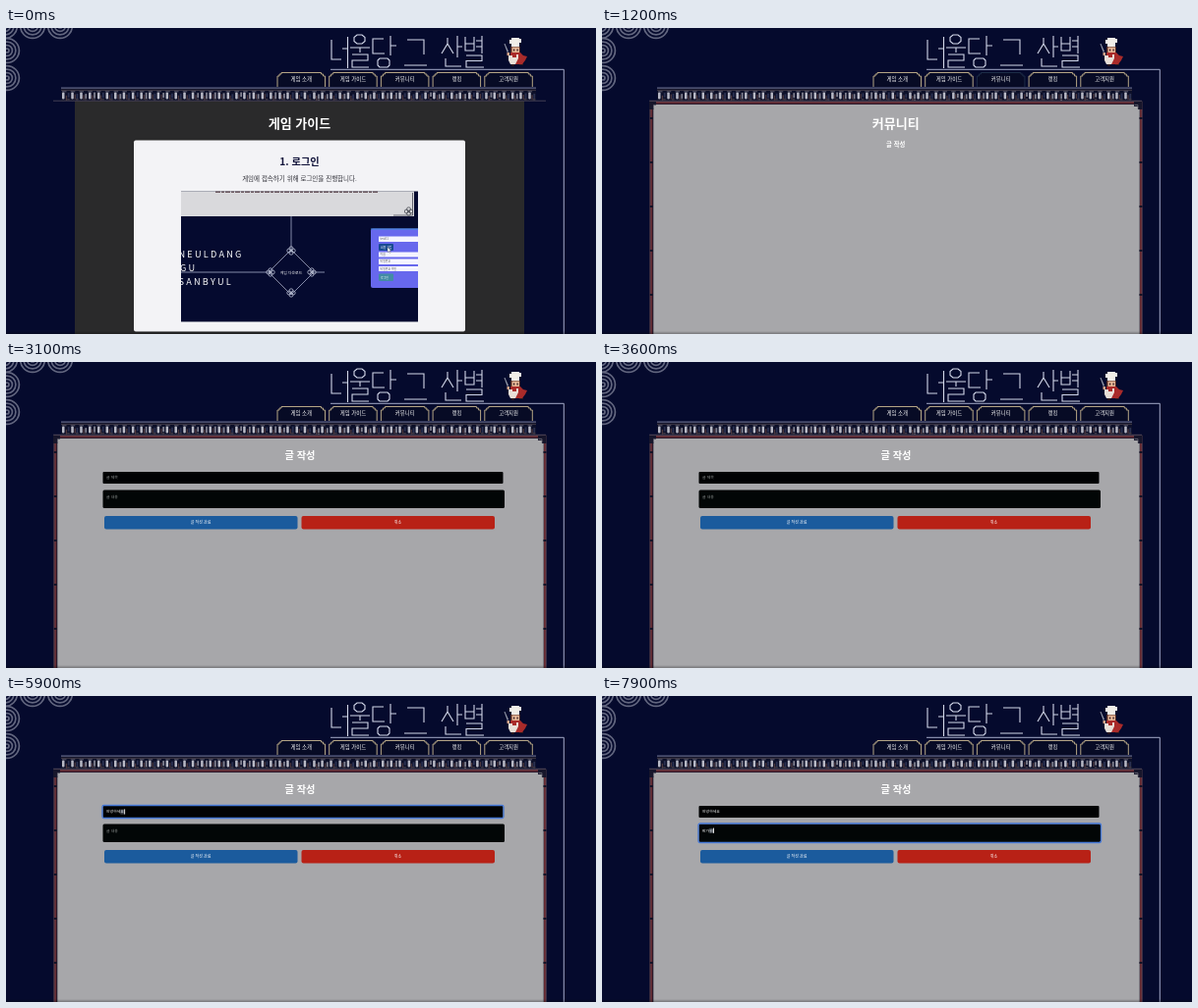
An HTML page that plays this animation: 600 by 312 pixels, repeating every 8000 ms.

```html
<!DOCTYPE html>
<html lang="ko">
<head>
<meta charset="utf-8">
<title>게임 안내</title>
<style>
html, body { margin: 0; width: 100%; height: 100%; overflow: hidden; background: #050a2d; }
svg { display: block; width: 100vw; height: 100vh; }
text { font-family: "Noto Sans CJK KR", "Noto Sans CJK", sans-serif; fill: #fff; }
.mid { text-anchor: middle; }
.bold { font-weight: 700; }
.medium { font-weight: 500; }
.line { fill: none; stroke: #a4abc8; }
#guide, #board, #write, #focusTitle, #focusBody { animation: 8s step-end infinite; }
#guide { animation-name: guide; }
#board { animation-name: board; }
#write { animation-name: write; }
#focusTitle { animation-name: focus-title; }
#focusBody { animation-name: focus-body; }
.hovered { animation: hover 8s step-end infinite; }
@keyframes guide { 0% { visibility: visible } 13.75%, to { visibility: hidden } }
@keyframes board { 0% { visibility: hidden } 13.75% { visibility: visible } 37.5%, to { visibility: hidden } }
@keyframes write { 0% { visibility: hidden } 37.5%, to { visibility: visible } }
@keyframes hover { 0% { stroke: #b5a685 } 10% { stroke: #1c2c46 } 22.5%, to { stroke: #b5a685 } }
@keyframes focus-title { 0% { visibility: hidden } 52.5% { visibility: visible } 78.75%, to { visibility: hidden } }
@keyframes focus-body { 0% { visibility: hidden } 78.75%, to { visibility: visible } }
</style>
</head>
<body>
<svg viewBox="0 0 600 312" preserveAspectRatio="none">
  <defs>
    <linearGradient id="shade" x2="0" y2="1">
      <stop offset="0" stop-color="#000" stop-opacity="0"/>
      <stop offset="1" stop-color="#000" stop-opacity=".3"/>
    </linearGradient>
    <clipPath id="screen"><path d="M178 166.500H419V299.500H178Z"/></clipPath>
    <g id="knot" fill="none" stroke="#b9bed2" stroke-width=".8">
      <circle cx="-2.200" r="2"/><circle cx="2.200" r="2"/><circle cy="-2.200" r="2"/><circle cy="2.200" r="2"/>
    </g>
  </defs>
  <rect width="600" height="312" fill="#050a2d"/>

  <g id="rings" fill="none" stroke="#62667f" stroke-width="1.700"></g>

  <path class="line" d="M330 42.300H567.300V312"/>
  <path role="img" aria-label="너울당 그 산별" fill="none" stroke="#d3d8ea" stroke-width="1.100" d="
    M331 12V32H341M347.500 9V41M342 21H347.500
    M357 7H362L365 9.500V13.500L362 16H357L354 13.500V9.500ZM350 20H370M360 20V25M352 27H368V33H352V40H369
    M384 11H373V26H385M391 8V28M391 18H397M380 31H388L390 33V38L388 40H380L378 38V33Z
    M408 12H425V27M405 38H428
    M449 10V16L443 26M449 16L455 26M459 8V30M459 19H464M447 31V39H463
    M467 9V23H476V9M467 16H476M484 8V26M478 13H484M478 19H484M468 28H484V33.500H468V40H486"/>

  <g id="chef">
    <path fill="#f1eee8" d="M512 12h2v-2h8v1h2v4h-2v4h-8v-3h-2z"/>
    <path fill="#4b2724" d="M513 19h10v6h-10z"/>
    <path fill="#e6b494" d="M514.500 19.500h7.500v5.500h-7.500z"/>
    <path fill="#2a1820" d="M516 21.500h1.200v2H516zM519.500 21.500h1.200v2h-1.200zM514 37h3v2h-3zM522 36h4v2h-4z"/>
    <path fill="#a92b2a" d="M513 25h10l3 3 4 1-2 4-3 4h-10l-3-3 1-5z"/>
    <path fill="#e9dfd7" d="M511 28h4v2h4v-3h2v4l-3 6h-5l-2-4z"/>
    <path fill="#d8a58a" d="M509.500 25h2.500v3h-2.500z"/>
    <path fill="#969bab" d="M506.500 16h1l3.500 8-1.200 1z"/>
  </g>

  <g id="nav"></g>

  <g id="guide">
    <path fill="#2a2a2b" d="M70 74H527V312H70Z"/>
    <text class="mid bold" x="298.500" y="102" font-size="13">게임 가이드</text>
    <rect x="130" y="114.500" width="337" height="195" rx="2" fill="#f3f3f6"/>
    <text class="mid bold" x="298.500" y="139.800" font-size="10.200" style="fill:#11133a">1. 로그인</text>
    <text class="mid" x="298.500" y="156" font-size="6.500" style="fill:#303038">게임에 접속하기 위해 로그인을 진행합니다.</text>
    <g clip-path="url(#screen)">
      <path fill="#050a2f" d="M178 166H419V300H178Z"/>
      <path fill="#d9d9dc" d="M178 166H415V192H178Z"/>
      <path stroke="#4a3038" stroke-width="1.500" stroke-dasharray="5 1 3 1" d="M213 167H378"/>
      <path class="line" style="stroke:#4c4c58" stroke-width=".8" d="M394 191H413.500V168"/>
      <use href="#knot" x="409.500" y="187" style="filter:brightness(.4)"/>
      <path class="line" stroke-width=".8" d="M290 192V226L313 249L290 272L267 249L290 226M178 249H267M313 249H324"/>
      <use href="#knot" x="290" y="227"/><use href="#knot" x="290" y="270"/>
      <use href="#knot" x="269" y="249"/><use href="#knot" x="311" y="249"/>
      <text class="mid" x="290" y="250.600" font-size="3.900">게임 다운로드</text>
      <g font-size="9.200" font-weight="300" letter-spacing="2.200">
        <text x="175.500" y="234">NEULDANG</text>
        <text x="177" y="248">GU</text>
        <text x="175.500" y="262">SANBYUL</text>
      </g>
      <rect x="371" y="204.500" width="52" height="60.500" rx="2" fill="#6768ed"/>
      <path stroke="#438fd8" stroke-width="1" d="M371 205H419"/>
      <path fill="#f4f4ff" d="M379 212.500h41v5.500h-41zM379 228.500h41v5h-41zM379 235.500h41v5.500h-41zM379 243h41v5h-41z"/>
      <rect x="379" y="220" width="15" height="7" rx="1" fill="#174a91"/>
      <rect x="379" y="250.500" width="15" height="7.500" rx="1" fill="#438ba5"/>
      <g font-size="2.900">
        <text x="381" y="225">회원 가입</text>
        <text x="381" y="255.500">로그인</text>
        <g style="filter:brightness(.35)">
          <text x="380.500" y="216.400">test01</text><text x="380.500" y="232.200">이름</text>
          <text x="380.500" y="239.400">비밀번호</text><text x="380.500" y="246.600">비밀번호 확인</text>
        </g>
      </g>
      <path fill="#fff" stroke="#222" stroke-width=".3" d="M388 223.500v5l1.200-1 1 1.800 .9-.5-1-1.700h1.500z"/>
    </g>
  </g>

  <g id="board">
    <use href="#frame"/>
    <text class="mid bold" x="298.700" y="102" font-size="13">커뮤니티</text>
    <text class="mid bold" x="298.700" y="120.800" font-size="6.300">글 작성</text>
  </g>

  <g id="write">
    <use href="#frame"/>
    <text class="mid bold" x="299" y="99" font-size="10.200">글 작성</text>
    <rect x="98.500" y="112" width="407" height="12" rx="1" fill="#010203"/>
    <rect x="98.500" y="130.500" width="408.500" height="18.500" rx="1.500" fill="#020606"/>
    <rect x="100" y="157" width="196.500" height="13.500" rx="2" fill="#1b5b9d"/>
    <rect x="300.500" y="157" width="196.500" height="13.500" rx="2" fill="#b82116"/>
    <g font-size="4" class="mid medium">
      <text x="198" y="165.300">글 작성 완료</text>
      <text x="398.500" y="165.300">취소</text>
    </g>
  </g>
  <g fill="none" stroke="#4678d6" stroke-width="1.300">
    <rect id="focusTitle" x="98" y="111.500" width="408" height="13" rx="1.500"/>
    <rect id="focusBody" x="98" y="130" width="409.500" height="19.500" rx="2"/>
  </g>
  <g id="fields" font-size="3.900"></g>

  <g id="roof"></g>
  <rect y="309" width="600" height="3" fill="url(#shade)"/>

  <defs>
    <g id="frame">
      <path fill="#17142a" d="M48 74H549.500V312H48Z"/>
      <path fill="#a7a7aa" d="M52.300 78H546.700V312H52.300Z"/>
      <path fill="none" stroke="#632a31" stroke-width="2" d="M50.300 312V76.200H548V312"/>
      <path fill="none" stroke="#85606c" stroke-width=".6" d="M49 312V75H549.200V312"/>
      <path stroke="#141226" stroke-width="3" stroke-dasharray="2 43" d="M50.300 91V312M548 91V312"/>
      <path fill="#17162b" d="M48 75h7v4h-2.500v4H48zM541 75h8.500v8H545v-3h-4z"/>
      <path fill="none" stroke="#777783" stroke-width=".7" d="M55 78.500h-2.500v4M541.500 78.500h3.500v4"/>
    </g>
  </defs>
</svg>
<script>
const LOOP = 8000;
const NS = "http://www.w3.org/2000/svg";
const $ = id => document.getElementById(id);

function add(parent, tag, attrs, label = "") {
  const node = document.createElementNS(NS, tag);
  for (const key in attrs) node.setAttribute(key, attrs[key]);
  node.textContent = label;
  parent.append(node);
  return node;
}

for (const [cx, cy] of [[-1, -2], [27, -2], [55, -2], [1, 23], [1, 51]])
  for (const r of [12.4, 8.9, 5.4, 2]) add($("rings"), "circle", { cx, cy, r });

["게임 소개", "게임 가이드", "커뮤니티", "랭킹", "고객지원"].forEach((label, i) => {
  const x = 276 + i * 52.7;
  add($("nav"), "path", {
    d: `M${x} 60V49H${x + 2}V47H${x + 4}V45.500H${x + 44.5}V47H${x + 46.5}V49H${x + 48.5}V60`,
    fill: "#070b25", stroke: "#b5a685", class: i === 2 ? "hovered" : ""
  });
  add($("nav"), "text", { x: x + 24.3, y: 53.8, "font-size": 5.4, class: "mid medium" }, label);
});

// Tiled eaves: pale posts with uneven brown and blue blocks between them.
function buildRoof() {
  let seed = 7;
  const random = () => (seed = seed * 16807 % 2147483647) / 2147483647;
  const block = (x, y, width, height, fill, rx = 0) =>
    add($("roof"), "rect", { x, y, width, height, fill, rx });
  block(56, 61, 483, 13.5, "#0d1029");
  block(56, 60.6, 483, 1, "#777c9e");
  block(56, 62.8, 483, 1.2, "#37313f");
  for (let i = 0; i < 55; i++) {
    const x = 57 + i * 8.77;
    block(x + random(), 65.5, 2.5, 7, "#b9bac6", 1);
    block(x, 64.3, 4.5, 1, "#5c5b6b");
    block(x + 3.8, 67 + random() * 2, 1.3, 5, "#4d393f");
    block(x + 5.8, 65.5 + random() * 2, 1.8, 4 + random() * 3, random() < 0.5 ? "#80808f" : "#2b3151");
    block(x + 5.2, 72, 2.5, 1.5, "#3d3742");
  }
  block(48, 73.8, 501, 0.8, "#504a5b");
}
buildRoof();

function makeField(y, placeholder, focusAt, blurAt, keys) {
  return {
    placeholder, focusAt, blurAt, keys,
    text: add($("fields"), "text", { x: 102, y }),
    mark: add($("fields"), "rect", { y: y - 3.8, width: 3.6, height: 5, fill: "#b8c4d8", opacity: 0.35 }),
    caret: add($("fields"), "rect", { y: y - 4, width: 0.9, height: 5.2, fill: "#fff" })
  };
}

const fields = [
  makeField(119.4, "글 제목", 4200, 6300, [
    [4600, "ㅇ"], [4700, "아"], [4800, "안"], [4900, "안ㄴ"], [5000, "안녀"], [5150, "안녕"],
    [5300, "안녕ㅎ"], [5400, "안녕하"], [5550, "안녕핫"], [5650, "안녕하세"],
    [5800, "안녕하셍"], [5900, "안녕하세요"]]),
  makeField(138.6, "글 내용", 6300, LOOP, [
    [7000, "ㅂ"], [7100, "바"], [7250, "반"], [7400, "반ㄱ"], [7500, "반가"],
    [7650, "반강"], [7750, "반가우"], [7850, "반가워"]])
];

function drawField(f, t) {
  const key = f.keys.filter(([at]) => at <= t).pop();
  const value = key ? key[1] : "";
  const focused = t >= f.focusAt && t < f.blurAt;
  const since = t - (key ? key[0] : f.focusAt);
  f.text.textContent = value || f.placeholder;
  f.text.style.fill = value ? "#f4f4f4" : "#8a8f8d";
  f.text.style.visibility = t < 3000 ? "hidden" : "visible";

  const width = value ? f.text.getComputedTextLength() : 0;
  f.caret.setAttribute("x", 102.3 + width);
  f.caret.style.visibility = focused && since % 1000 < 500 ? "visible" : "hidden";
  f.mark.setAttribute("x", 98.4 + width);
  f.mark.style.visibility = focused && value ? "visible" : "hidden";
}

function draw() {
  const t = performance.now() % LOOP;
  fields.forEach(f => drawField(f, t));
  requestAnimationFrame(draw);
}
draw();
</script>
</body>
</html>
```
